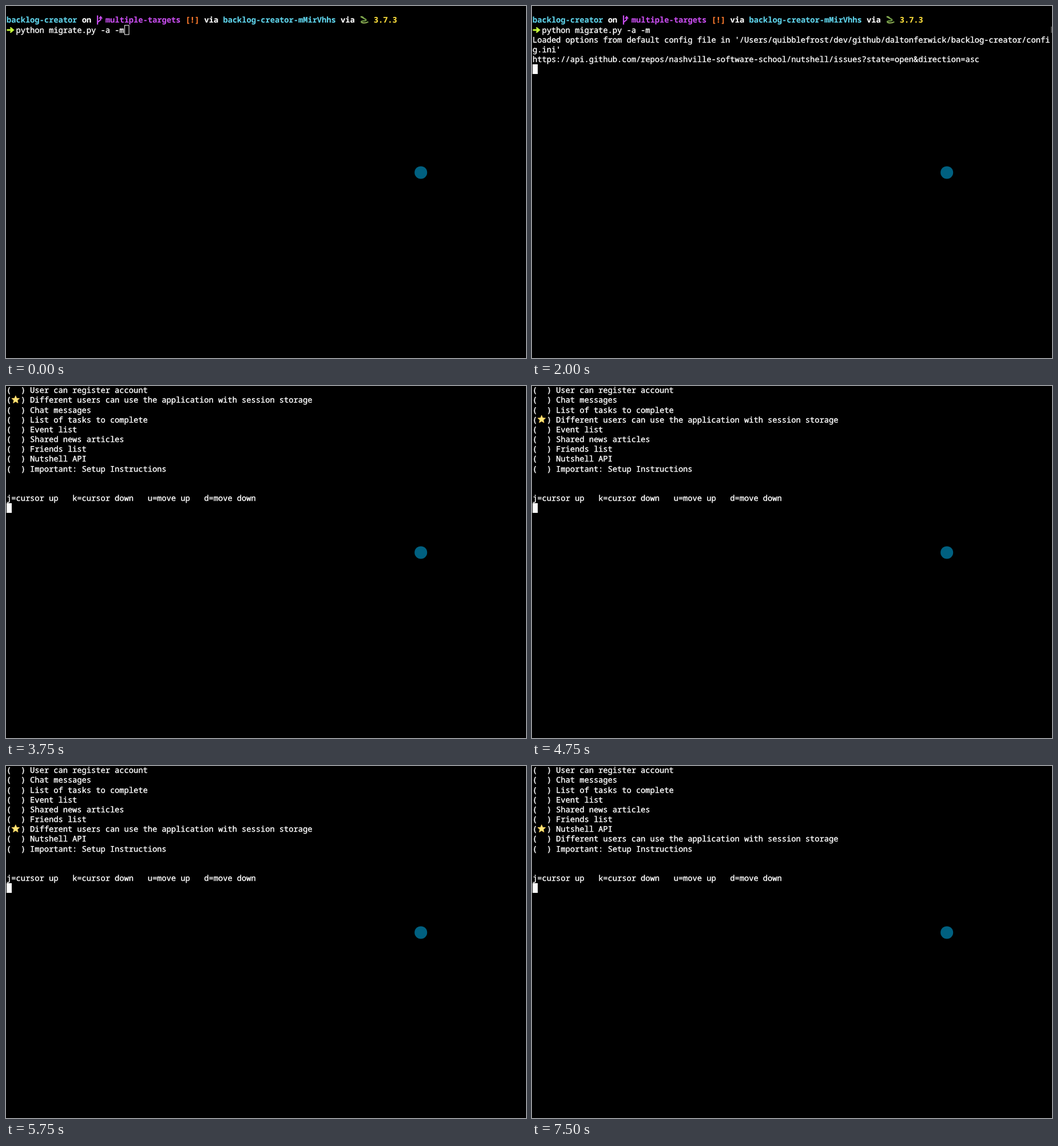
These frames come from a looping animation (909 px wide and 616 px high, 8 s). An HTML page:

```html
<!DOCTYPE html>
<html lang="en">
<head>
<meta charset="utf-8">
<title>Backlog migration</title>
<style>
  html, body { margin: 0; width: 100%; height: 100%; overflow: hidden; background: #000; }
  svg { display: block; width: 100%; height: 100%; }
  text {
    font: 500 13.71px "Noto Sans Mono", "DejaVu Sans Mono", monospace;
    font-variant-ligatures: none;
    text-rendering: geometricPrecision;
    white-space: pre;
    fill: currentColor;
    stroke: currentColor;
    stroke-width: .4px;
  }
  .bold { font-weight: 700; stroke-width: .15px; }
</style>
</head>
<body>
<svg viewBox="0 0 909 616">
  <rect width="909" height="616"/>
  <g id="screen"></g>
  <circle cx="725.2" cy="291.4" r="11" fill="#006080"/>
  <circle id="ripple" cx="725.5" cy="302.5" r="14" fill="none" stroke="#006080" stroke-width="1.5"/>
</svg>
<script>
const LOOP = 8000, COL = 8.227, ROW = 17.17;
const screen = document.getElementById('screen');
const ripple = document.getElementById('ripple');

const stories = ['User can register account', 'Chat messages', 'List of tasks to complete',
  'Event list', 'Shared news articles', 'Friends list', 'Nutshell API',
  'Important: Setup Instructions'];
const moved = 'Different users can use the application with session storage';
const help = 'j=cursor up   k=cursor down   u=move up   d=move down';

// [start time, value] steps
const slotSteps = [[2500, 1], [4500, 2], [4750, 3], [5000, 4], [5250, 5], [5750, 6], [7250, 7]];
const starSteps = [[2500, 0], [3750, 1], ...slotSteps.slice(1), [7500, 6]];
const rippleSteps = [[0, 0], [500, 0.8], [750, 0.5], [1000, 0.25], [1250, 0]];
const valueAt = (steps, t) => steps.filter(s => s[0] <= t).pop()[1];

const colX = c => 1 + c * COL;
const rowY = r => r * ROW - 1;
const escape = s => s.replace(/&/g, '&amp;').replace(/</g, '&lt;');

function write(row, col, str, color = '#fff', cls = '') {
  return `<text class="${cls}" x="${colX(col)}" y="${rowY(row) + 13.2}" style="color:${color}">${escape(str)}</text>`;
}

function cursor(row, col, solid = true) {
  const x = colX(col), y = rowY(row);
  return solid
    ? `<rect x="${x}" y="${y}" width="9" height="17" fill="#fff"/>`
    : `<rect x="${x + 0.7}" y="${y + 0.5}" width="7.6" height="16.2" fill="none" stroke="#fff"/>`;
}

function star(row) {
  const points = Array.from({ length: 10 }, (_, i) => {
    const r = i % 2 ? 3.3 : 7.2, a = i * Math.PI / 5;
    return [16.8 + r * Math.sin(a), rowY(row) + 7.9 - r * Math.cos(a)].map(n => n.toFixed(2));
  });
  return `<polygon points="${points.join(' ')}" fill="#ffe67a" stroke="#f8cb55" stroke-width=".8" stroke-linejoin="round"/>`;
}

const branchIcon = `<path d="M160 16.5V32.5M160 28.5L165.5 24V20.5" fill="none" stroke="#c74ded" stroke-width="2.2"/>
  <path d="M161.8 22L165.5 17L169 22Z" fill="#c74ded"/>`;
const arrowIcon = `<path d="M1.5 40.6H8L6.8 37.2H9L14.6 42L9 46.8H6.8L8 43.4H1.5Z" fill="#c3f73a"/>`;
const snakeIcon = `<g fill="none" stroke-linecap="round">
  <path d="M632.5 28C628 30.5 620.5 30 621 27.5C621.5 25.5 629.5 27 629.5 24.5C629.5 22.5 625 22.5 623 19.5" stroke="#6f9a45" stroke-width="2.3"/>
  <path d="M631 29C627 30 622.5 29.8 621.8 28" stroke="#b5bf68" stroke-width=".9"/>
  <path d="M621 19L624 20" stroke="#86ad52" stroke-width="2.8"/></g>`;

const prompt = [
  [0, 'backlog-creator', '#5fd3ea'], [16, 'on', '#fff'], [21, 'multiple-targets', '#c74ded'],
  [38, '[!]', '#ff7b2e'], [42, 'via', '#fff'], [46, 'backlog-creator-mMirVhhs', '#5fd3ea'],
  [71, 'via', '#fff'], [78, '3.7.3', '#ffe13d'],
].map(([col, str, color]) => write(1, col, str, color, 'bold')).join('')
  + branchIcon + snakeIcon + arrowIcon + write(2, 2, 'python migrate.py -a -m');

const log = [
  "Loaded options from default config file in '/Users/quibblefrost/dev/github/daltonferwick/backlog-creator/confi",
  "g.ini'",
  'https://api.github.com/repos/nashville-software-school/nutshell/issues?state=open&direction=asc',
].map((line, i) => write(3 + i, 0, line)).join('');

const edgeMark = '<rect x="907" y="36" width="2" height="11" fill="#484848"/>';

function shell(t) {
  if (t < 1250) return prompt + cursor(2, 25, t >= 500);
  return prompt + edgeMark + (t < 2000 ? cursor(3, 0) : log + cursor(6, 0));
}

function list(t) {
  const rows = [...stories];
  rows.splice(valueAt(slotSteps, t), 0, moved);
  return rows.map((s, i) => write(i, 0, '(  ) ' + s)).join('')
    + star(valueAt(starSteps, t)) + write(11, 0, help) + cursor(12, 0);
}

let shown = '';
function render(t) {
  const next = t < 2500 ? shell(t) : list(t);
  if (next !== shown) screen.innerHTML = shown = next;
  ripple.setAttribute('opacity', valueAt(rippleSteps, t));
}

const start = performance.now();
function tick() {
  render((performance.now() - start) % LOOP);
  requestAnimationFrame(tick);
}
tick();
</script>
</body>
</html>
```
